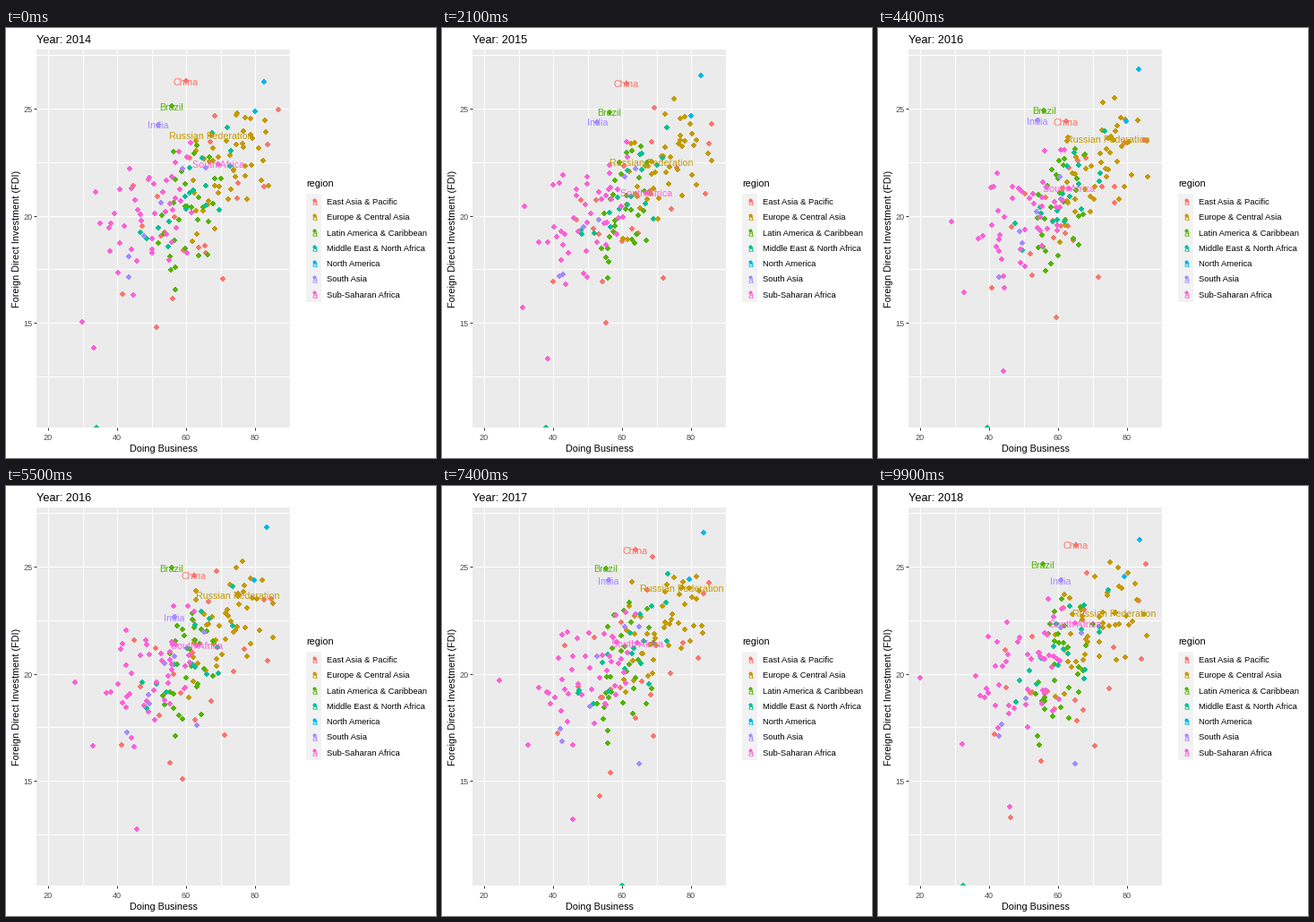
A matplotlib script for the animation above (10 s loop, 480 by 480 pixels).

```python
import numpy as np
import matplotlib.pyplot as plt
from matplotlib.animation import FuncAnimation
from matplotlib.patches import Rectangle

plt.rcParams["font.family"] = "Liberation Sans"

SIZE, DPI, FRAMES = 480, 100, 100
PT = 72 / DPI  # points per pixel
LEFT, TOP, RIGHT, BOTTOM = 34, 23.5, 318, 445.5
YEAR_FRAMES = [0, 25, 50, 74, 99]

EAST, EUROPE, LATIN, MIDEAST, NORTH, SOUTH, AFRICA = range(7)
REGIONS = ["East Asia & Pacific", "Europe & Central Asia",
           "Latin America & Caribbean", "Middle East & North Africa",
           "North America", "South Asia", "Sub-Saharan Africa"]
COLORS = ["#F8766D", "#C49A00", "#53B400", "#00C094",
          "#00B6EB", "#A58AFF", "#FB61D7"]

# region: count, centre, spread, correlation (stage pixels)
CLOUDS = {
    EAST: (20, (209, 208), (46, 60), -0.55),
    EUROPE: (46, (248, 155), (26, 33), -0.4),
    LATIN: (30, (203, 203), (17, 42), -0.35),
    MIDEAST: (18, (208, 185), (30, 30), -0.5),
    SOUTH: (6, (172, 215), (32, 40), -0.2),
    AFRICA: (44, (163, 208), (28, 33), -0.15),
}

# Points apart from the clouds: first, middle and last year
LONERS = [
    (NORTH, (288, 60), (291, 44), (292, 60)),
    (NORTH, (278, 93), (277, 106), (275, 101)),
    (EAST, (304, 91), (296, 130), (299, 87)),
    (EAST, (168, 334), (203, 322), (148, 370)),
    (AFRICA, (98, 357), (146, 386), (147, 358)),
    (AFRICA, (85, 328), (97, 290), (94, 288)),
    (AFRICA, (100, 183), (80, 220), (47, 214)),
]

# Yearly positions; in the slipped years the row swaps with a neighbour
LABELS = [
    ("China", EAST, (206, 216), (1, 2),
     [(201, 59), (207, 62), (211, 69), (216, 71), (221, 66)]),
    ("Brazil", LATIN, (186, 236), (3,),
     [(185, 87), (187, 95), (185, 91), (183, 92), (184, 87)]),
    ("India", SOUTH, (220, 310), (2, 3),
     [(170, 108), (174, 104), (179, 103), (186, 105), (204, 105)]),
    ("Russian Federation", EUROPE, (215, 165), (1, 2, 3),
     [(229, 120), (235, 155), (270, 110), (268, 113), (264, 142)]),
    ("South Africa", AFRICA, (200, 193), (1, 2, 3),
     [(237, 152), (226, 190), (217, 174), (218, 175), (220, 153)]),
]

# The point on the floor of the panel: x from and to, per interval
FLOOR = [(101, 119), (220, 91), (np.nan, np.nan), (201, 95)]

rng = np.random.default_rng(14)


def px(v):
    return 47 + (v - 20) * 3.85


def py(v):
    return 90 + (25 - v) * 23.9


def mix(a, b, f):
    return np.asarray(a) * (1 - f) + np.asarray(b) * f


def make_cloud(n, centre, spread, corr):
    """Start and end of every row for each yearly interval."""
    u, v = np.tanh(rng.normal(size=(2, n)) / 2)
    u, v = ((w - w.mean()) / w.std() for w in (u, v))
    z = np.column_stack([u, corr * u + np.sqrt(1 - corr ** 2) * v])
    base = np.array(centre) + z * spread
    years = base + rng.normal(size=(5, n, 2)) * (4, 10)
    rows = []
    for k in range(4):
        # rows past a gap in the data pair up with their neighbour
        cut = rng.integers(n // 4, n)
        order = np.r_[np.arange(cut), np.roll(np.arange(cut, n), -1)]
        rows.append((years[k], years[k + 1][order]))
    return rows


clouds = {r: make_cloud(*spec) for r, spec in CLOUDS.items()}

fig = plt.figure(figsize=(SIZE / DPI, SIZE / DPI), dpi=DPI, facecolor="white")
ax = fig.add_axes([0, 0, 1, 1])
ax.set_xlim(0, SIZE)
ax.set_ylim(SIZE, 0)
ax.axis("off")


def write(x, y, s, size, color="black", **kw):
    return ax.text(x, y, s, fontsize=size * PT, color=color, **kw)


def box(x, y, w, h, color):
    return ax.add_patch(Rectangle((x, y), w, h, fc=color, ec="none", zorder=0))


def line(xs, ys, color):
    ax.plot(xs, ys, color=color, lw=PT, zorder=1, solid_capstyle="butt")


def dots(xy, colors):
    return ax.scatter(*np.transpose(xy), s=(4.1 * PT) ** 2, c=colors,
                      linewidths=0, antialiaseds=False, zorder=2)


panel = box(LEFT, TOP, RIGHT - LEFT, BOTTOM - TOP, "#EBEBEB")
for v in range(20, 91, 10):
    line([px(v)] * 2, [TOP, BOTTOM], "white")
for v in np.arange(12.5, 28, 2.5):
    line([LEFT, RIGHT], [py(v)] * 2, "white")
for v in range(20, 81, 20):
    line([px(v)] * 2, [BOTTOM, BOTTOM + 3], "#333333")
    write(px(v), 460, v, 9.2, "#4D4D4D", ha="center")
for v in (15, 20, 25):
    line([LEFT - 3, LEFT], [py(v)] * 2, "#333333")
    write(29.5, py(v) + 4, v, 9.2, "#4D4D4D", ha="right")

title = write(34, 17, "", 12.7)
write(175.5, 473, "Doing Business", 10.9, ha="center")
write(12, 235, "Foreign Direct Investment (FDI)", 10.9, rotation=90,
      ha="center", va="center")

write(335, 177, "region", 10.9)
for r, name in enumerate(REGIONS):
    y = 193.3 + 17.28 * r
    box(335, y - 8.64, 17.28, 17.28, "#F2F2F2")
    dots([(344, round(y - 1.5))], COLORS[r])
    write(344, y + 4.8, "a", 10.6, COLORS[r], ha="center")
    write(358, y + 3.7, name, 9.4)

dot_colors = [COLORS[r] for r in clouds for _ in range(CLOUDS[r][0])]
dot_colors += [COLORS[r] for r, *_ in LONERS]
dot_colors += [COLORS[r] for _, r, *_ in LABELS for _ in range(2)]
dot_colors.append(COLORS[MIDEAST])
points = dots(np.zeros((len(dot_colors), 2)), dot_colors)
points.set_clip_path(panel)
texts = [write(0, 0, name, 10.6, COLORS[r], ha="center", zorder=3)
         for name, r, *_ in LABELS]


def update(i):
    t = np.interp(i, YEAR_FRAMES, range(5))
    k = min(int(t), 3)
    f = t - k
    xy = [mix(*rows[k], f) for rows in clouds.values()]
    for _, first, middle, last in LONERS:
        xy.append([mix(first, middle, t / 2) if t < 2
                   else mix(middle, last, t / 2 - 1)])
    for text, (_, _, neighbour, slips, keys) in zip(texts, LABELS):
        here, there = keys[k], keys[k + 1]
        leave, arrive = (neighbour, neighbour) if k in slips else (there, here)
        pair = [mix(here, leave, f), mix(arrive, there, f)]
        xy.append(pair)
        # the name hops to the arriving row halfway through the year
        x, y = pair[int(f >= 0.5)]
        text.set_position((x, y + 4.5))
    xy.append([(mix(*FLOOR[k], f), BOTTOM)])
    points.set_offsets(np.round(np.vstack(xy)))
    title.set_text(f"Year: {round(2014 + 4 * i / (FRAMES - 1))}")
    return [points, title, *texts]


anim = FuncAnimation(fig, update, frames=FRAMES, interval=100, repeat=True)
plt.show()
```
